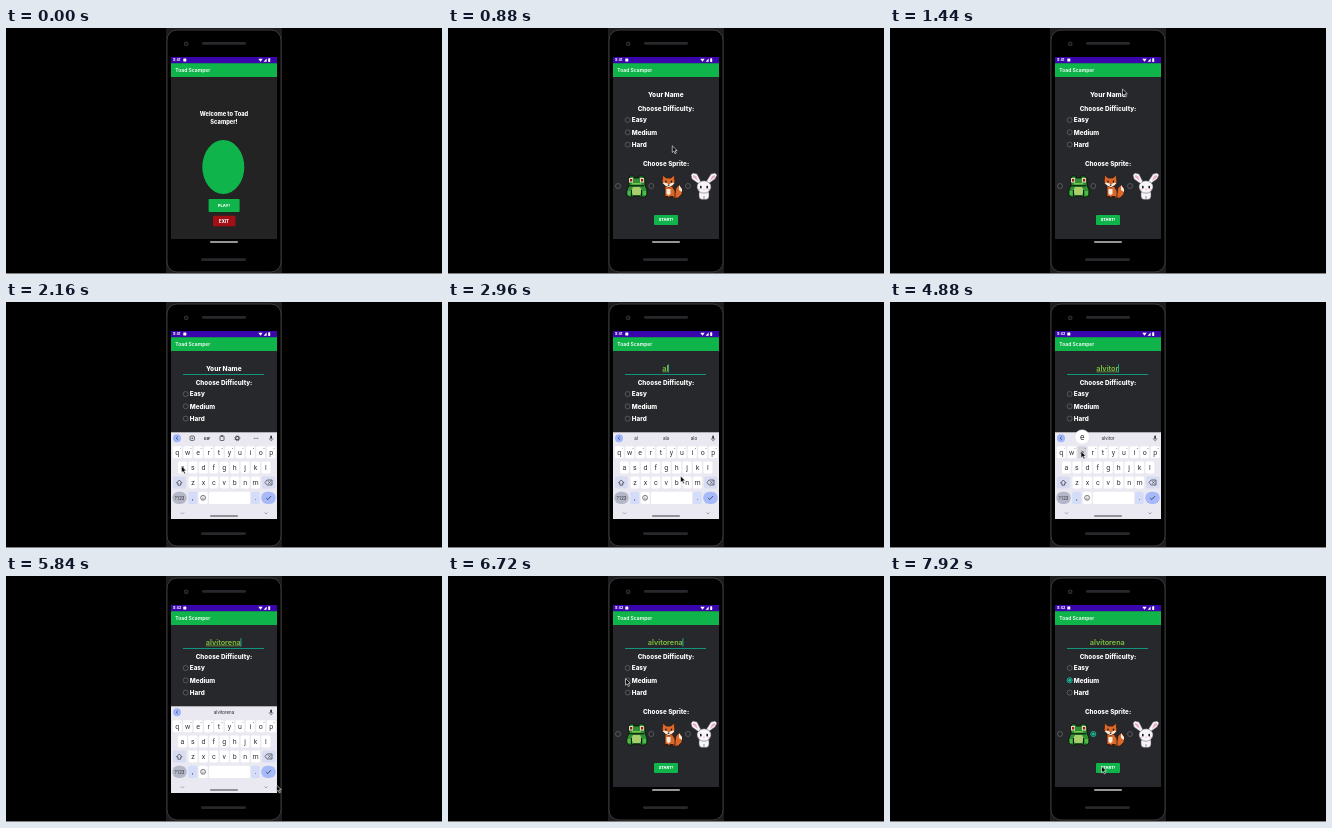
An HTML page that plays this animation: 436x246 px, repeating every 8 s.

```html
<!DOCTYPE html>
<html lang="en">
<head>
<meta charset="utf-8">
<title>Toad Scamper</title>
<style>
html, body { margin: 0; width: 100%; height: 100%; overflow: hidden; background: #000; }
svg { display: block; width: 100vw; height: 100vh; }
text { font-family: Inter, "Open Sans", sans-serif; }
.title { font-weight: 800; font-size: 6.3px; fill: #fff; }
.key { font-family: Roboto, sans-serif; font-size: 7px; fill: #33343b; text-anchor: middle; }
.mid { text-anchor: middle; }
</style>
</head>
<body>
<svg id="stage" viewBox="0 0 436 246"></svg>
<script>
const LOOP = 8000;
const NAME = 'alvitorena';
const APP = 'Toad Scamper';
const GREEN = '#0fb54b';
const PAGE = '#26282b';
const stage = document.getElementById('stage');

function add(parent, tag, attrs = {}, content) {
  const el = document.createElementNS('http://www.w3.org/2000/svg', tag);
  for (const k in attrs) el.setAttribute(k, attrs[k]);
  if (content !== undefined) el.textContent = content;
  parent.appendChild(el);
  return el;
}
const group = (p, attrs) => add(p, 'g', attrs);
const box = (p, x, y, width, height, fill, rx = 0) => add(p, 'rect', { x, y, width, height, fill, rx });
const dot = (p, cx, cy, r, fill) => add(p, 'circle', { cx, cy, r, fill });
const path = (p, d, fill, stroke = 'none', w = 0.6) =>
  add(p, 'path', { d, fill, stroke, 'stroke-width': w, 'stroke-linejoin': 'round' });
const label = (p, x, y, s, cls, size, fill) =>
  add(p, 'text', { x, y, class: cls, style: (size ? `font-size:${size}px;` : '') + (fill ? `fill:${fill}` : '') }, s);
const show = (el, on) => el.setAttribute('visibility', on ? 'visible' : 'hidden');

// Phone body
box(stage, 0, 245, 436, 1, '#808080');
box(stage, 160, 0, 116, 245, '#1d1d1f');
add(stage, 'rect', { x: 161, y: 2, width: 114, height: 242, rx: 10, fill: '#000', stroke: '#3a3a3d', 'stroke-width': 1 });
box(stage, 196, 14, 44, 2.8, '#27282b', 1.4);
box(stage, 195, 230.2, 45, 2.8, '#27282b', 1.4);
dot(stage, 180.2, 15.8, 2.4, '#2b2d31');
dot(stage, 180.2, 15.8, 1, '#07090c');

// Screen
const defs = add(stage, 'defs');
box(add(defs, 'clipPath', { id: 'glass' }), 165, 29, 106, 188);
const screen = group(stage, { 'clip-path': 'url(#glass)' });
box(screen, 165, 28, 106, 190, '#000');

// Welcome page
const home = group(screen);
box(home, 165, 49, 106, 162, '#232324');
label(home, 218, 87.9, 'Welcome to Toad', 'title mid', 5.7);
label(home, 218, 95.8, 'Scamper!', 'title mid', 5.7);
add(home, 'ellipse', { cx: 217.3, cy: 139, rx: 21, ry: 27, fill: GREEN });
box(home, 202.6, 171, 31, 13, GREEN, 0.8);
label(home, 218, 179.1, 'PLAY!', 'title mid', 4);
box(home, 207, 187.8, 22.4, 10.4, '#a30f14', 0.8);
label(home, 218, 194.6, 'EXIT', 'title mid', 4.2);

// Settings page
const form = group(screen);
box(form, 165, 49, 106, 162, PAGE);
const hint = label(form, 217.8, 68.8, 'Your Name', 'title mid', 6.6);
const field = label(form, 217.3, 68.7, '', 'mid', 7.3, '#7fc241');
field.style.fontWeight = 600;
const under = box(form, 0, 69.6, 0, 0.6, '#7fc241');
const line = box(form, 177, 72, 81, 1, '#12957f');
const caret = box(form, 217, 62.3, 0.8, 8.2, '#1fc4a8');
label(form, 218, 82.8, 'Choose Difficulty:', 'title mid');
label(form, 218, 138, 'Choose Sprite:', 'title mid');

function radio(x, y) {
  add(form, 'circle', { cx: x, cy: y, r: 2.5, fill: 'none', stroke: '#75787b', 'stroke-width': 0.6 });
  const on = group(form);
  add(on, 'circle', { cx: x, cy: y, r: 2.5, fill: PAGE, stroke: '#12c49e', 'stroke-width': 0.8 });
  dot(on, x, y, 1.5, '#12c49e');
  return on;
}
const levels = ['Easy', 'Medium', 'Hard'].map((s, i) => {
  const y = 92 + i * 12.3;
  label(form, 183.8, y + 2.2, s, 'title');
  return radio(179.7, y);
});
const picks = [170, 203.3, 240].map(x => radio(x, 158));

function drawFrog(p) {
  const ink = '#0b1d0d', skin = '#2f8f35';
  path(p, 'M182 148h4v2h5v-2h4l2 3v6l2 5v5l-2 2h-5v-1h-7v1h-4l-2-2v-5l2-5v-6z', skin, ink, 1);
  for (const x of [181, 192]) {
    box(p, x, 150, 4, 4.5, '#ecd9bd');
    box(p, x + 1, 151, 2.2, 2.5, '#8d2019');
  }
  box(p, 184, 155, 9, 1.4, '#76c94a');
  box(p, 181, 157.2, 15, 1.2, ink);
  path(p, 'M185 159h7l2 4-2 4h-7l-2-4z', '#a9cf6c');
  for (const x of [179.5, 195]) box(p, x, 163, 3, 4, '#4dbb48');
  for (const x of [183, 193]) box(p, x, 162, 1, 6.5, ink);
}
function drawFox(p) {
  const ink = '#3a1b10', fur = '#d9682a', cream = '#f8ecdc';
  path(p, 'M224 168l3-3 1-5 3-3 3 4v5l-4 4h-5z', fur, ink, 0.8);
  path(p, 'M231 157l3 4v3l-3-2z', cream);
  path(p, 'M217 158h7l3 5v6h-10z', fur, ink, 0.8);
  path(p, 'M215 147l3 3h5l3-3 1 7-2 3-4 2.5-4-2.5-3-3z', fur, ink, 0.8);
  path(p, 'M214.5 155l3-.5 3.5 2 3-2 2.5.5-2 2.3-3.5 2-3.5-1.5z', cream);
  for (const x of [217.3, 222.8]) box(p, x, 152.7, 1.3, 1.9, '#17110f');
  box(p, 219.8, 156.6, 1.6, 1.2, '#17110f');
  path(p, 'M218.5 161h4v4.5l-2 2-2-2z', cream);
  for (const x of [217, 222]) box(p, x, 168, 3, 2.2, ink);
}
function drawBunny(p) {
  const fur = '#f7f5f7', ink = '#55505d', pink = '#efa9c0';
  path(p, 'M251 156l-7-5-1-4 2-2 4 1 4 8z', fur, ink, 0.5);
  path(p, 'M260 156l7-5 2-4-2-2-4 1-5 8z', fur, ink, 0.5);
  path(p, 'M250 153l-5-4 0-2 3 1z', pink);
  path(p, 'M262 153l5-4 0-2-3 1z', pink);
  add(p, 'rect', { x: 251, y: 162, width: 10, height: 9.6, rx: 3.5, fill: fur, stroke: ink, 'stroke-width': 0.5 });
  add(p, 'ellipse', { cx: 256, cy: 159, rx: 7, ry: 6.2, fill: fur, stroke: ink, 'stroke-width': 0.5 });
  for (const x of [252, 258.4]) box(p, x, 157.8, 1.6, 2.6, '#17141a', 0.6);
  box(p, 255.3, 160.8, 1.4, 0.9, pink);
  for (const x of [250, 260.2]) box(p, x, 161, 1.8, 1, pink);
  box(p, 255.7, 168, 0.6, 3.4, ink);
}
drawFrog(form);
drawFox(form);
drawBunny(form);
box(form, 206, 187, 24, 10, GREEN, 1);
label(form, 218, 193.4, 'START!', 'title mid', 3.9);

// Bars
box(screen, 165, 28, 106, 7, '#3a05ad');
const clock = label(screen, 167, 33.4, '9:41', 'title', 3.5);
box(screen, 177.3, 30.5, 3, 3, '#fff', 0.5);
path(screen, 'M252.3 30.8h4.4l-2.2 3z', '#fff');
path(screen, 'M257.6 33.8h3v-3.4z', '#fff');
box(screen, 262.2, 30.3, 2, 3.6, '#fff', 0.4);
box(screen, 165, 35, 106, 1, '#188a55');
box(screen, 165, 36, 106, 13, GREEN);
label(screen, 169.3, 44.4, APP, '', 5, '#fff').style.fontWeight = 600;
box(screen, 165, 211, 106, 7, '#000');
box(screen, 204, 213.3, 28, 1.4, '#c8c8c8', 0.7);

// Keyboard
const board = group(screen);
box(board, 165, 130.3, 106, 88, '#eae8f1');
dot(board, 171, 136.2, 4, '#a0b6fb');
path(board, 'M171.8 134.6l-1.6 1.6 1.6 1.6', 'none', '#26304f', 0.7);
box(board, 264.2, 133.6, 1.8, 3.4, '#33343b', 0.9);
path(board, 'M263.2 136.2a1.9 1.9 0 0 0 3.8 0M265.1 138v1.3', 'none', '#33343b', 0.5);

const tools = group(board);
const outline = { fill: 'none', stroke: '#44454d', 'stroke-width': 0.8 };
add(tools, 'rect', { x: 184, y: 134, width: 4.4, height: 4.4, rx: 1, ...outline });
dot(tools, 186.2, 136.2, 0.8, '#44454d');
label(tools, 201, 137.7, 'GIF', 'key', 4.2).style.fontWeight = 700;
add(tools, 'rect', { x: 214, y: 134, width: 4, height: 4.5, rx: 0.6, ...outline });
box(tools, 215, 133.3, 2, 1.3, '#44454d');
add(tools, 'circle', { cx: 231.3, cy: 136.2, r: 1.7, ...outline, 'stroke-width': 1.2 });
add(tools, 'circle', { cx: 231.3, cy: 136.2, r: 2.6, ...outline, 'stroke-dasharray': '1 1.04' });
[248.3, 250, 251.7].forEach(x => dot(tools, x, 136.2, 0.55, '#44454d'));

const words = [188, 218, 246].map(x => label(board, x, 137.9, '', 'key', 4.7));

const keys = {};
[['qwertyuiop', 171.3, 150.3], ['asdfghjkl', 176.5, 165.4], ['zxcvbnm', 187, 180.5]].forEach(([row, x0, y], r) => {
  [...row].forEach((c, i) => {
    const x = x0 + i * 10.43;
    const cap = box(board, x - 4.5, y - 6, 9, 12, '#fff', 1.4);
    label(board, x, y + 2.2, c, 'key');
    if (!r) label(board, x + 3.1, y - 3.4, String((i + 1) % 10), 'key', 2.4);
    keys[c] = { x, y, cap };
  });
});
box(board, 166.8, 174.5, 13, 12, '#d7dcf2', 1.6);
path(board, 'M173.3 178l2.8 2.9h-1.4v2.3h-2.8v-2.3h-1.4z', 'none', '#33343b', 0.7);
box(board, 256, 174.5, 13.4, 12, '#d7dcf2', 1.6);
path(board, 'M259 180.5l2.1-2.5h4.9v5h-4.9z', 'none', '#33343b', 0.7);
path(board, 'M262.2 179.2l2.5 2.6m0-2.6l-2.5 2.6', 'none', '#33343b', 0.6);
box(board, 166.3, 189.7, 14.4, 12.2, '#b3b7c8', 6);
label(board, 173.5, 197.6, '?123', 'key', 4.6);
box(board, 182.2, 189.7, 9, 12.2, '#d3dcf8', 1.5);
label(board, 186.7, 198, ',', 'key');
box(board, 192.6, 189.7, 9, 12.2, '#fff', 1.5);
add(board, 'circle', { cx: 197.1, cy: 195.8, r: 2.5, fill: 'none', stroke: '#33343b', 'stroke-width': 0.6 });
path(board, 'M195.7 196.4q1.4 1.7 2.8 0', 'none', '#33343b', 0.5);
dot(board, 196.2, 195, 0.4, '#33343b');
dot(board, 198, 195, 0.4, '#33343b');
box(board, 203, 189.7, 41, 12.2, '#fff', 1.5);
box(board, 245.2, 189.7, 8.4, 12.2, '#d3dcf8', 1.5);
label(board, 249.4, 198, '.', 'key');
box(board, 255.2, 189.7, 14.6, 12.2, '#a6bafa', 6);
path(board, 'M260.2 196l1.6 1.6 3.2-3.5', 'none', '#26304f', 0.8);
[176.5, 260].forEach(x => path(board, `M${x - 1.6} 210.4l1.6 1.6 1.6-1.6`, 'none', '#777985', 0.6));
box(board, 204, 213.3, 28, 1.4, '#77757d', 0.7);

const popup = group(board);
add(popup, 'circle', { r: 7.3, fill: '#fff', stroke: '#d5d3dd', 'stroke-width': 0.4 });
const popText = label(popup, 0, 2.6, '', 'key', 8.5);

const mouse = path(stage, 'M0 0v6.7l1.6-1.4 1.2 2.6 1.2-.6-1.2-2.5h2.1z', '#080808', '#fff', 0.6);

// Timing
const presses = [2240, 2680, 3080, 3440, 3800, 4160, 4480, 4780, 5080, 5400];
const HOLD = 140;
const OPEN = 1560, CLOSE = 6180;
const stops = [[0, 216, 175], [480, 216, 175], [1280, 232.5, 61], [1560, 232.5, 61], [2040, 176, 163]];
presses.forEach((t, i) => {
  const k = keys[NAME[i]];
  const x = k.x - 1.2, y = k.y - 1;
  stops.push([t - 20, x, y], [t + HOLD, x, y]);
});
stops.push([5800, 270.5, 209], [5900, 270.5, 209], [6080, 262, 195], [6240, 262, 195],
  [6640, 177.5, 102.5], [6880, 177.5, 102.5], [7200, 202.5, 157], [7400, 202.5, 157],
  [7800, 211.5, 190], [LOOP, 211.5, 190]);

const clamp = v => Math.max(0, Math.min(1, v));
const ease = v => v * v * (3 - 2 * v);
const ramp = (t, from, dur) => ease(clamp((t - from) / dur));

function mouseAt(t) {
  const i = Math.max(1, stops.findIndex(s => s[0] > t));
  const [a, x, y] = stops[i - 1], [b, u, v] = stops[i];
  const p = ramp(t, a, b - a);
  return [x + (u - x) * p, y + (v - y) * p];
}

function suggest(s) {
  if (!s) return ['', '', ''];
  return s.length < 5 ? [s, s + 'a', s + 'o'] : ['', s, ''];
}

let shown = null;
function draw(t) {
  form.setAttribute('opacity', ramp(t, 600, 200));
  clock.textContent = t < 3000 ? '9:41' : '9:42';

  const typed = NAME.slice(0, presses.filter(p => t >= p + HOLD).length);
  if (typed !== shown) {
    shown = typed;
    field.textContent = typed;
    suggest(typed).forEach((w, i) => { words[i].textContent = w; });
  }
  const width = typed ? field.getComputedTextLength() : 0;
  const active = t >= OPEN;
  show(hint, !typed);
  show(tools, !typed);
  show(line, active);
  under.setAttribute('x', 217.3 - width / 2);
  under.setAttribute('width', t < CLOSE ? width : 0);
  caret.setAttribute('x', 217 + width / 2);
  // The caret restarts its blink after each letter
  const last = presses.reduce((m, p) => (t >= p + HOLD ? p + HOLD : m), OPEN);
  const blink = t < CLOSE ? t - last : t - CLOSE - 40;
  show(caret, active && (blink + 1000) % 1000 < 600);

  const up = ramp(t, OPEN, 200) * (1 - ramp(t, CLOSE, 200));
  board.setAttribute('transform', `translate(0 ${(1 - up) * 88})`);
  show(board, up > 0);
  if (up === 0) show(tools, false);

  const n = presses.findIndex(p => t >= p && t < p + HOLD);
  for (const c in keys) keys[c].cap.setAttribute('fill', n >= 0 && NAME[n] === c ? '#d4d3dc' : '#fff');
  popup.setAttribute('display', n >= 0 ? 'inline' : 'none');
  if (n >= 0) {
    const k = keys[NAME[n]];
    popup.setAttribute('transform', `translate(${k.x} ${k.y - 15.3})`);
    popText.textContent = NAME[n];
  }

  levels.forEach((el, i) => show(el, i === 1 && t >= 6800));
  picks.forEach((el, i) => show(el, i === 1 && t >= 7300));
  const [x, y] = mouseAt(t);
  mouse.setAttribute('transform', `translate(${x} ${y})`);
  show(mouse, t >= 320);
}

function tick() {
  draw(performance.now() % LOOP);
  requestAnimationFrame(tick);
}
tick();
</script>
</body>
</html>
```
